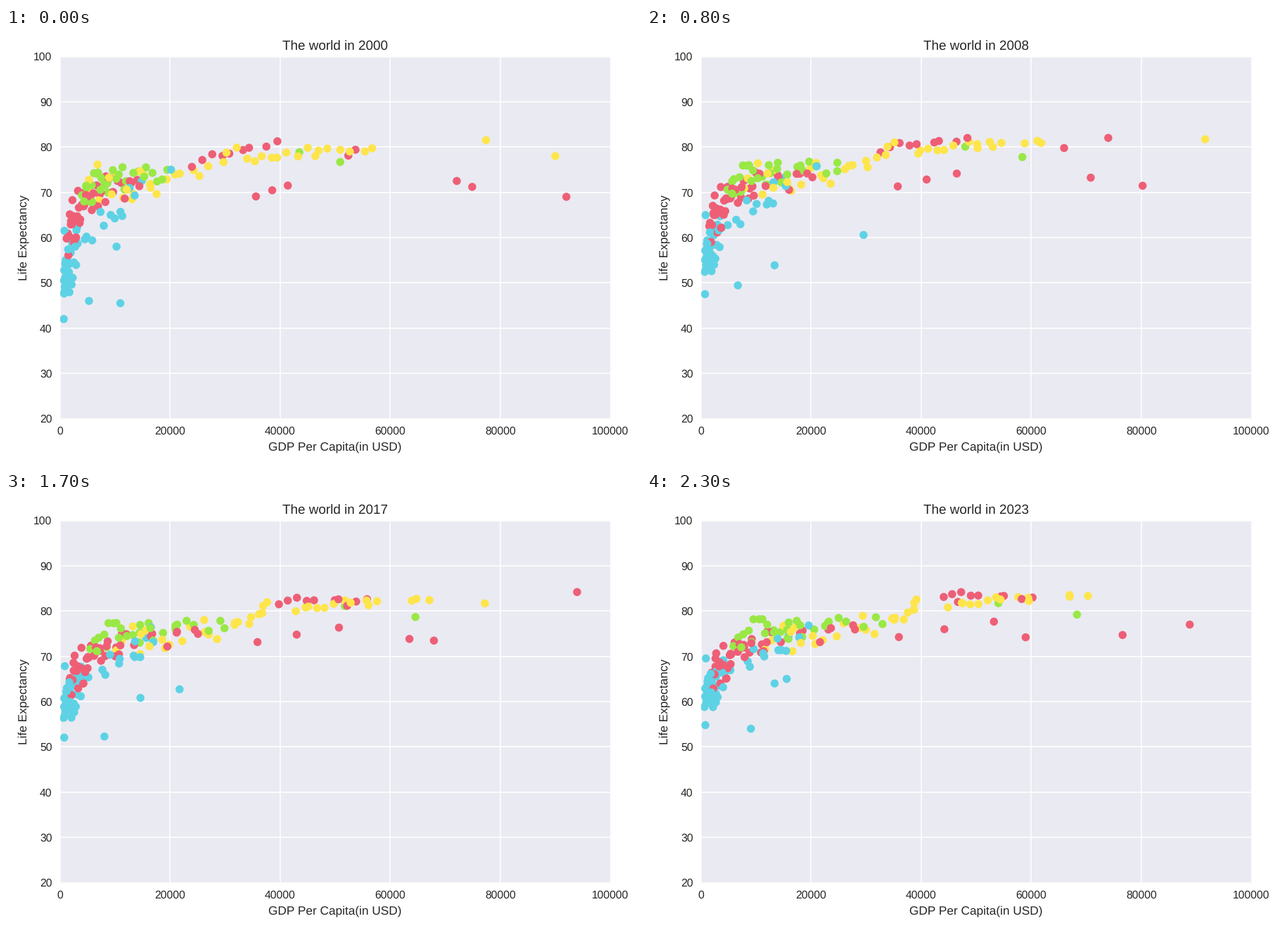
These frames come from a looping animation (903x620 px, 2400 ms). A matplotlib script:

```python
import numpy as np
import matplotlib.pyplot as plt
from matplotlib.animation import FuncAnimation

W, H, DPI = 903, 620, 128
LEFT, RIGHT, TOP, BOTTOM = 76.5, 859.5, 40.5, 555.5
PT = 113 / DPI  # type and line weights are set for 113 dpi
YEARS = 24

RED, BLUE, GREEN, YELLOW = "#ee5f76", "#5ed2e5", "#99e845", "#fee54b"

# Each region runs from its poorest to its richest country:
# color, count, noise, then (income in thousands, life) in the first and last year.
REGIONS = [
    (BLUE, 50, 4.2, ([.7, 1.1, 1.8, 3.3, 15], [52, 52, 55, 59, 71]),
                    ([.6, 1.4, 2.3, 4.6, 19], [62, 63, 64, 67, 75])),
    (RED, 45, 3.2, ([1.2, 2.7, 4.3, 7.5, 15], [60, 66, 67, 70, 73]),
                   ([1.7, 3.6, 6.5, 11.5, 28], [66, 69, 71, 73, 77])),
    (RED, 3, .3, ([35, 42], [69, 72]), ([34, 54], [74, 78])),
    (RED, 9, .8, ([22, 40], [76, 81.5]), ([41, 61], [84, 83])),
    (GREEN, 31, 2.8, ([3.8, 6.4, 8.9, 12.6, 20.5], [72, 71, 73, 74, 74]),
                     ([5.5, 10, 14.7, 20.9, 33], [74, 76, 76, 77, 78])),
    (GREEN, 2, .3, ([39, 52], [79.5, 76.5]), ([44, 70], [83, 79])),
    (YELLOW, 39, 2, ([4.3, 11.6, 17.7, 30.6, 42, 58], [74, 71, 73, 77, 79, 80]),
                    ([11.7, 21, 34, 40, 53, 71], [74, 75, 78, 81, 82.5, 84])),
]

# Countries that leave the crowd: income at the key years, first and last life.
KEYS = [0, 6, 11, 23]
OUTLIERS = [
    (RED, [92, 94.2, 59.3, 76.6], (69, 74.7)),
    (RED, [72.1, 72.7, 68, 59], (72.5, 74.2)),
    (RED, [74.9, 94.9, 115, 88.8], (71.2, 77)),
    (RED, [53.7, 69.4, 80.9, 107], (79.4, 85.5)),
    (RED, [52.4, 71.5, 57.7, 46.7], (78.1, 82)),
    (YELLOW, [46.4, 52.8, 53.4, 101], (78, 82.7)),
    (YELLOW, [77.4, 84, 103, 105], (81.5, 82)),
    (YELLOW, [90, 105.5, 110, 115], (78, 82)),
    (BLUE, [10.3, 29.2, 30.1, 13.4], (58, 64)),
    (BLUE, [11, 13.2, 13.7, 15.6], (45.5, 65)),
    (BLUE, [5.3, 6.5, 7.1, 9.1], (46, 54)),
    (BLUE, [20.2, 26.1, 13.5, 19.6], (75, 76.8)),
]

rng = np.random.default_rng(7)
years = np.arange(YEARS)
ease = (years / (YEARS - 1)) ** .8  # growth slows over time


def blend(first, last):
    return first + np.multiply.outer(ease, np.subtract(last, first))


def region(count, noise, first, last):
    """Income and life of every country, spread by rank with some scatter."""
    rank = (np.arange(count) + rng.random(count)) / count
    drift = np.clip(rank + rng.normal(0, .03, count), 0, 1)
    scatter = noise * (1.2 - .8 * rank) * np.clip(rng.normal(size=count), -2, 2)

    def place(u, values):
        return np.interp(u, np.linspace(0, 1, len(values)), values)

    income = blend(place(rank, first[0]), place(drift, last[0]))
    life = blend(place(rank, first[1]) + scatter, place(drift, last[1]) + .75 * scatter)
    return np.dstack([income, life])


def outlier(income, life):
    return np.dstack([np.interp(years, KEYS, income)[:, None], blend(*life)[:, None]])


groups = [(c, region(*spec)) for c, *spec in REGIONS]
groups += [(c, outlier(*spec)) for c, *spec in OUTLIERS]
points = np.concatenate([g for _, g in groups], axis=1) * [1000, 1]
colors = np.concatenate([[c] * g.shape[1] for c, g in groups])
order = rng.permutation(len(colors))
points, colors = points[:, order], colors[order]

plt.rc("font", family="Liberation Sans")
plt.rc("text", color=".15", hinting="none")
plt.rc("axes", labelcolor=".15")

fig = plt.figure(figsize=(W / DPI, H / DPI), dpi=DPI, facecolor="white")
ax = fig.add_axes([LEFT / W, 1 - BOTTOM / H, (RIGHT - LEFT) / W, (BOTTOM - TOP) / H],
                  facecolor="#eaeaf2")
ax.set(xlim=(0, 100000), ylim=(20, 100),
       xticks=range(0, 100001, 20000), yticks=range(20, 101, 10))
ax.set_axisbelow(True)
ax.grid(color="white", lw=PT)
ax.spines[:].set_visible(False)
ax.tick_params(length=0, pad=7 * PT, labelsize=10 * PT, labelcolor=".15")
ax.set_xlabel("GDP Per Capita(in USD)", size=11 * PT, labelpad=4 * PT)
ax.set_ylabel("Life Expectancy", size=11 * PT, labelpad=4 * PT)
title = ax.set_title("", size=12 * PT, pad=6 * PT)

dot = 11.5 * 72 / DPI
dots = ax.scatter(*points[0].T, s=dot ** 2, c=colors, linewidths=0, zorder=3)


def update(year):
    dots.set_offsets(points[year])
    title.set_text(f"The world in {2000 + year}")
    return dots, title


anim = FuncAnimation(fig, update, frames=YEARS, interval=100, repeat=True, repeat_delay=0)
plt.show()
```
